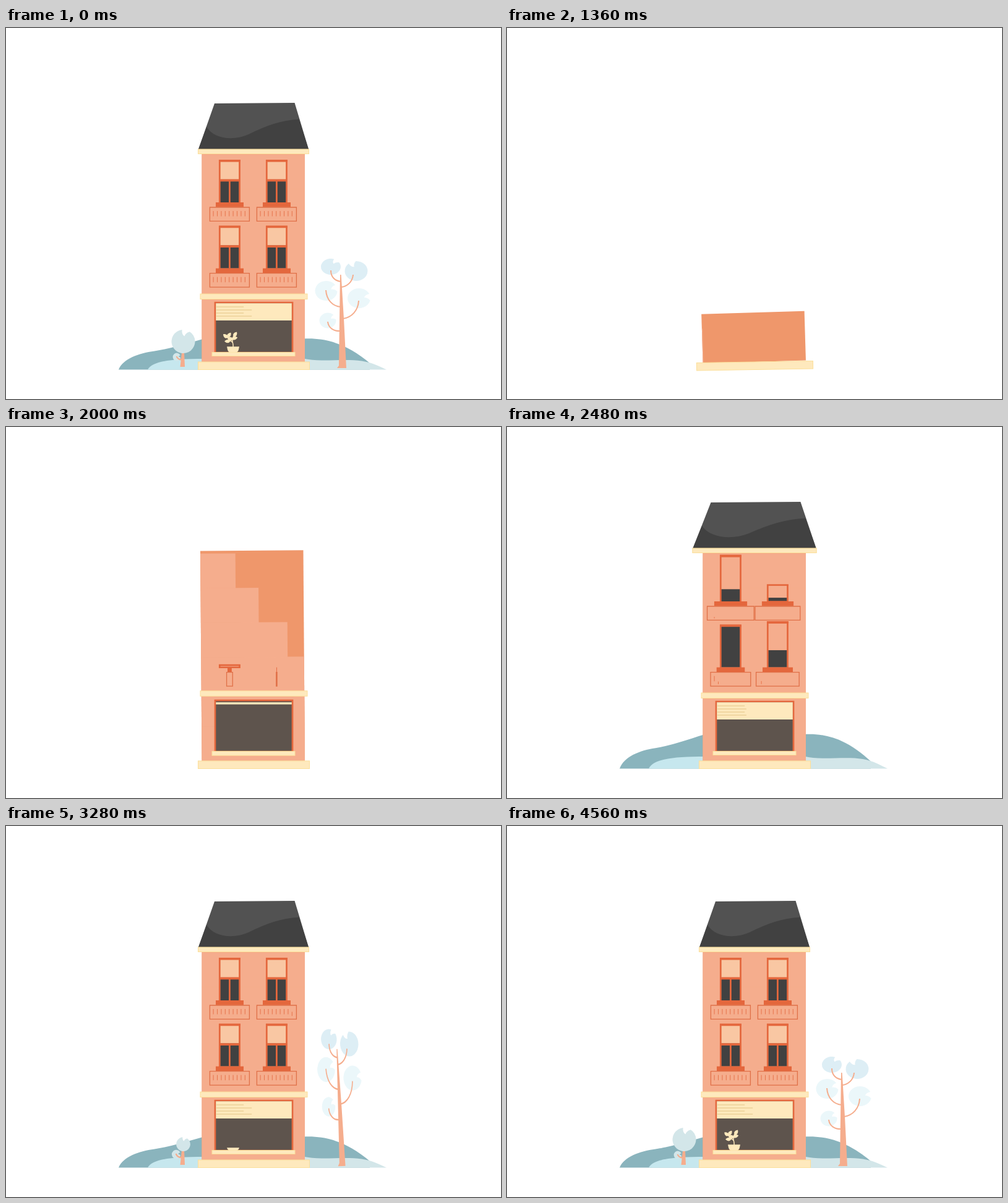
Write an HTML page that moves like this. It is 800x600 px and loops after 5.24 s.

```html
<!DOCTYPE html>
<html lang="en">
<head>
<meta charset="utf-8">
<title>House</title>
<style>
html, body { margin: 0; height: 100%; overflow: hidden; background: #fff; }
svg { display: block; width: 100vw; height: 100vh; }
.cream { fill: #fee9bd; }
.trim { fill: #fee9bd; stroke: #fbdf9b; }
.peach { fill: #f5ad8d; }
.brick { fill: #e4673d; }
.dark { fill: #414141; }
.frame { fill: none; stroke: #e4673d; stroke-width: 2.7; vector-effect: non-scaling-stroke; }
.rail { fill: none; stroke: #e07048; stroke-width: 1.3; vector-effect: non-scaling-stroke; }
.twig { fill: none; stroke: #f5ad8d; stroke-width: 2; }
.stem { fill: none; stroke: #fee9bd; stroke-width: 1.5; }
</style>
</head>
<body>
<svg viewBox="0 0 800 600">
  <defs>
    <path id="blob" d="M-.1-.995A1 1 0 1 0 .55-.835Q.2-.75.1-.45Q-.15-.6-.1-.995Z"/>
    <path id="leaf" d="M0 0C2-4 6-4 9.5 0C6 3.5 2 3.5 0 0Z"/>
  </defs>

  <g id="hills">
    <path fill="#8ab4bd" d="M182 552.5C189 535 214 526 240 522.5C270 518 295 509 320 502.5V552.5ZM480 502.5C522 500 556 515 588 542V552.5H480Z"/>
    <path fill="#c6e7ee" d="M229 552.5C237 538 270 535 320 535V552.5Z"/>
    <path fill="#d3e6e9" d="M480 534.5C510 541 545 534 575 538.5C592 541 605 548 615 552.5H480Z"/>
  </g>

  <g id="bush">
    <path class="peach" d="M284 525H288L289 548H281.5Z"/>
    <g id="curl">
      <use href="#blob" fill="#d3e6e9" transform="translate(276 532) rotate(70) scale(6.4)"/>
      <path class="twig" d="M275.5 531Q278 536.5 284 536.5" stroke-width="1.4"/>
    </g>
  </g>
  <use id="crown" href="#blob" fill="#d3e6e9"/>

  <g id="tree">
    <g id="blobs"></g>
    <path class="twig" d="M525 392C525 403 532 409 541 410M561 399C560 411 551 418 542 419M517 424C518 440 528 450 541 451M570 441C569 458 558 468 545 470M520 475C521 485 530 491 541 490"/>
    <path class="peach" d="M540 399H541.6L546 470L550 550H535L538 546Z"/>
  </g>

  <g id="body">
    <rect id="wall" x="316.5" y="198" width="166.5" height="342" fill="#ef976b"/>
    <g id="tiles" class="peach"></g>
  </g>
  <rect id="base" class="trim" x="310.5" y="540" width="180" height="12.5"/>

  <g id="windows"></g>
  <rect id="cornice" class="trim" x="314" y="430" width="173" height="8.5"/>

  <g id="roof">
    <path fill="#525252" d="M337 122L466.5 121L489 196H311Z"/>
    <path class="dark" d="M324 160C335 178 365 184 392 172C420 158 445 149 473.8 147.5L489 196H311Z"/>
  </g>
  <rect id="eave" class="trim" x="310.5" y="196" width="179" height="7.5"/>

  <g id="shop">
    <rect x="338" y="444" width="125" height="81" fill="#5e544d"/>
    <rect class="frame" x="338" y="444" width="125" height="81"/>
  </g>
  <rect id="awning" class="cream" x="339.2" y="445.2" width="122.6" height="27.8"/>
  <g id="lines" fill="#ebd198"></g>
  <rect id="ledge" class="trim" x="333" y="524.5" width="134" height="6"/>

  <path id="sprout" class="stem" d="M367 516C368 508 363 507 368 498M366.5 509C364 505 360 507 358 500"/>
  <g id="leaves" class="cream"></g>
  <path id="pot" class="cream" d="M357 515.3H377L376 520Q375 524.5 371 524.5H363Q359 524.5 358 520Z"/>
</svg>

<script>
const LOOP = 5240, STEP = 40, CLEAR = 640;
const $ = id => document.getElementById(id);

function add(parent, tag, attrs) {
  const el = document.createElementNS('http://www.w3.org/2000/svg', tag);
  for (const k in attrs) el.setAttribute(k, attrs[k]);
  return parent.appendChild(el);
}

const rect = (parent, cls, x, y, width, height) =>
  add(parent, 'rect', { class: cls, x, y, width, height });

const grow = (t, start, span = 245) => Math.min(1, Math.max(0, (t - start) / span));

// Rises from 0 to 1, then overshoots and settles.
function spring(t, start, amp = 0.2, rise = 245) {
  const p = grow(t, start, rise);
  if (p < 1) return p ** 1.3;
  const u = (t - start - rise) / 1000;
  return u < 0.75 ? 1 + amp * (1 - u / 0.75) ** 3 * Math.sin(12 * u) : 1;
}

// Scales and turns an element around a fixed point.
function pose(el, x, y, sx, sy = 1, turn = 0) {
  const shown = sx > 0 && sy > 0;
  el.style.display = shown ? '' : 'none';
  if (shown) el.setAttribute('transform',
    `translate(${x} ${y}) rotate(${turn}) scale(${sx} ${sy}) translate(${-x} ${-y})`);
}

// x, y, rx, ry, turn, colour
[
  [525, 386, 16, 13, 25, '#ddeef5'],
  [566, 393, 18.5, 16, -35, '#ddeef5'],
  [517.5, 425, 18, 16, 60, '#ebf7fa'],
  [570.5, 437, 18.5, 16, 70, '#ebf7fa'],
  [520, 473, 13.5, 12.5, 50, '#ebf7fa']
].forEach(([x, y, rx, ry, turn, fill]) => add($('blobs'), 'use', {
  href: '#blob', fill,
  transform: `translate(${x} ${y}) scale(${rx} ${ry}) rotate(${turn})`
}));

const ROW = 55.9;
const tiles = Array.from({ length: 6 }, (_, i) => {
  const y = 539.6 - ROW * (i + 1);
  return [rect($('tiles'), '', 316.5, y, 0, ROW + 0.4), rect($('tiles'), '', 483, y, 0, ROW + 0.4)];
});

// Offsets and start times of the moving parts of each window.
const windows = [
  { x: 0, y: 106.7, sill: 1930, frame: 1975, pane: 2180, blind: 2490, ticks: 2380 },
  { x: 76, y: 106.7, sill: 1985, frame: 2065, pane: 2377, blind: 2640, ticks: 2455 },
  { x: 0, y: 0, sill: 2080, frame: 2185, pane: 2407, blind: 2680, ticks: 2475 },
  { x: 76, y: 0, sill: 2130, frame: 2361, pane: 2458, blind: 2760, ticks: 2590 }
];
for (const w of windows) {
  const g = add($('windows'), 'g', { transform: `translate(${w.x} ${w.y})` });
  w.paneEl = rect(g, 'dark', 346, 216, 31, 66);
  w.postEl = rect(g, 'brick', 360, 246, 2.8, 36);
  w.blindEl = add(g, 'g', {});
  rect(w.blindEl, '', 346, 216, 31, 29).setAttribute('fill', '#f9c7a3');
  rect(w.blindEl, 'brick', 345, 244.5, 33, 3.8);
  w.frameEl = add(g, 'g', {});
  rect(w.frameEl, 'frame', 345.3, 214.3, 32.2, 69);
  rect(w.frameEl, 'brick', 344, 213, 34.8, 3.6);
  w.sillEl = add(g, 'g', {});
  rect(w.sillEl, 'brick', 339, 282, 45, 7.6);
  rect(w.sillEl, 'rail', 329.4, 290, 64, 22.4);
  w.tickEls = Array.from({ length: 9 }, (_, i) => rect(g, 'brick', 334.6 + 6.4 * i, 296, 1, 8.5));
  w.tickEls.forEach(el => el.setAttribute('opacity', 0.8));
}

const lines = [45, 58, 45, 58].map((size, i) => [size, rect($('lines'), '', 339.2, 450.3 + 5 * i, 0, 1.4)]);

// Base point and direction of each leaf.
const leaves = [
  [365, 503, -15], [367, 504, 200], [368, 499.5, -58],
  [358, 500.5, -55], [358.5, 501, 218], [362.5, 506, 175]
].map(([x, y, turn]) => ({ x, y, turn, el: add($('leaves'), 'use', { href: '#leaf' }) }));

function sway(t) {
  const u = t - 1290;
  return -2.4 * Math.max(0, 1 - Math.max(0, u) / 950) * Math.cos(2 * Math.PI * u / 630);
}

function drawWall(t) {
  pose($('body'), 400, 540, 1, 1, sway(t));
  pose($('wall'), 400, 540, 1, spring(t, 1280));
  pose($('base'), 400, 546, spring(t, 1039, 0.17, 120), 1,
    -0.9 * Math.sin(Math.PI * grow(t, 1160, 400)));
  tiles.forEach(([left, right], i) => {
    const p = grow(t, 1320 + 80 * i, 480);
    left.setAttribute('width', 166.5 * p * p);
    const w = i < 2 ? 20 * p ** 4 : 0;
    right.setAttribute('x', 483 - w);
    right.setAttribute('width', w);
  });
}

function drawWindow(w, t) {
  pose(w.sillEl, 361.4, 282, spring(t, w.sill, 0.3, 300));
  pose(w.frameEl, 361.4, 282, 1, spring(t, w.frame));
  pose(w.paneEl, 361.4, 282, 1, grow(t, w.pane));
  pose(w.blindEl, 361.4, 216, 1, grow(t, w.blind));
  pose(w.postEl, 361.4, 282, 1, grow(t, w.blind + 80));
  w.tickEls.forEach((el, i) => {
    const p = grow(t, w.ticks + 80 * i, 80);
    el.setAttribute('y', 296 + 12 * (1 - p));
    el.setAttribute('height', 8.5 * Math.sqrt(p));
  });
}

function drawShop(t) {
  const lift = spring(t, 1530);
  pose($('cornice'), 400, 430, lift > 0 ? 1 : 0);
  $('cornice').setAttribute('y', 430 + 110 * (1 - lift));
  pose($('shop'), 400, 526, 1, spring(t, 1580, 0.06));
  pose($('ledge'), 400, 524.5, 1, spring(t, 1645));
  pose($('awning'), 400, 445.2, 1, grow(t, 1970));
  for (const [size, el] of lines)
    el.setAttribute('width', Math.min(size, 58 * grow(t, 2200, 340)));
}

function drawGarden(t) {
  pose($('hills'), 400, 552.5, 1, spring(t, 2165));
  pose($('bush'), 285.5, 548, 1, spring(t, 2800));
  pose($('curl'), 284, 537, spring(t, 2960), spring(t, 2960));

  const c = 19 * spring(t, 3115, 0.45);
  $('crown').setAttribute('transform', `translate(286.5 ${526 - c}) scale(${c})`);

  const h = spring(t, 2990, 0.65, 250);
  const wide = Math.min(1.5 * h, 1 - 0.8 * (h - 1));
  pose($('tree'), 543, 550, wide, h, h > 0.8 ? -7.5 * (h - 1) : 1.5);
}

function drawPlant(t) {
  pose($('pot'), 367, 524.5, 1, spring(t, 3143));
  pose($('sprout'), 367, 516, 1, grow(t, 3480, 300));
  leaves.forEach(({ x, y, turn, el }, i) => {
    const s = spring(t, 3640 + 100 * i, 0.3, 160);
    el.setAttribute('transform', `translate(${x} ${y}) rotate(${turn}) scale(${s})`);
  });
}

function draw(now) {
  let t = Math.floor((now % LOOP) / STEP) * STEP;
  if (t < CLEAR) t += LOOP;
  drawGarden(t);
  drawWall(t);
  windows.forEach(w => drawWindow(w, t));
  drawShop(t);
  const span = spring(t, 2150);
  pose($('roof'), 400, 196, span, grow(t, 2150, 200));
  pose($('eave'), 400, 196, span);
  drawPlant(t);
}

let begin;
function tick(now) {
  begin ??= now;
  draw(now - begin);
  requestAnimationFrame(tick);
}
draw(0);
requestAnimationFrame(tick);
</script>
</body>
</html>
```
